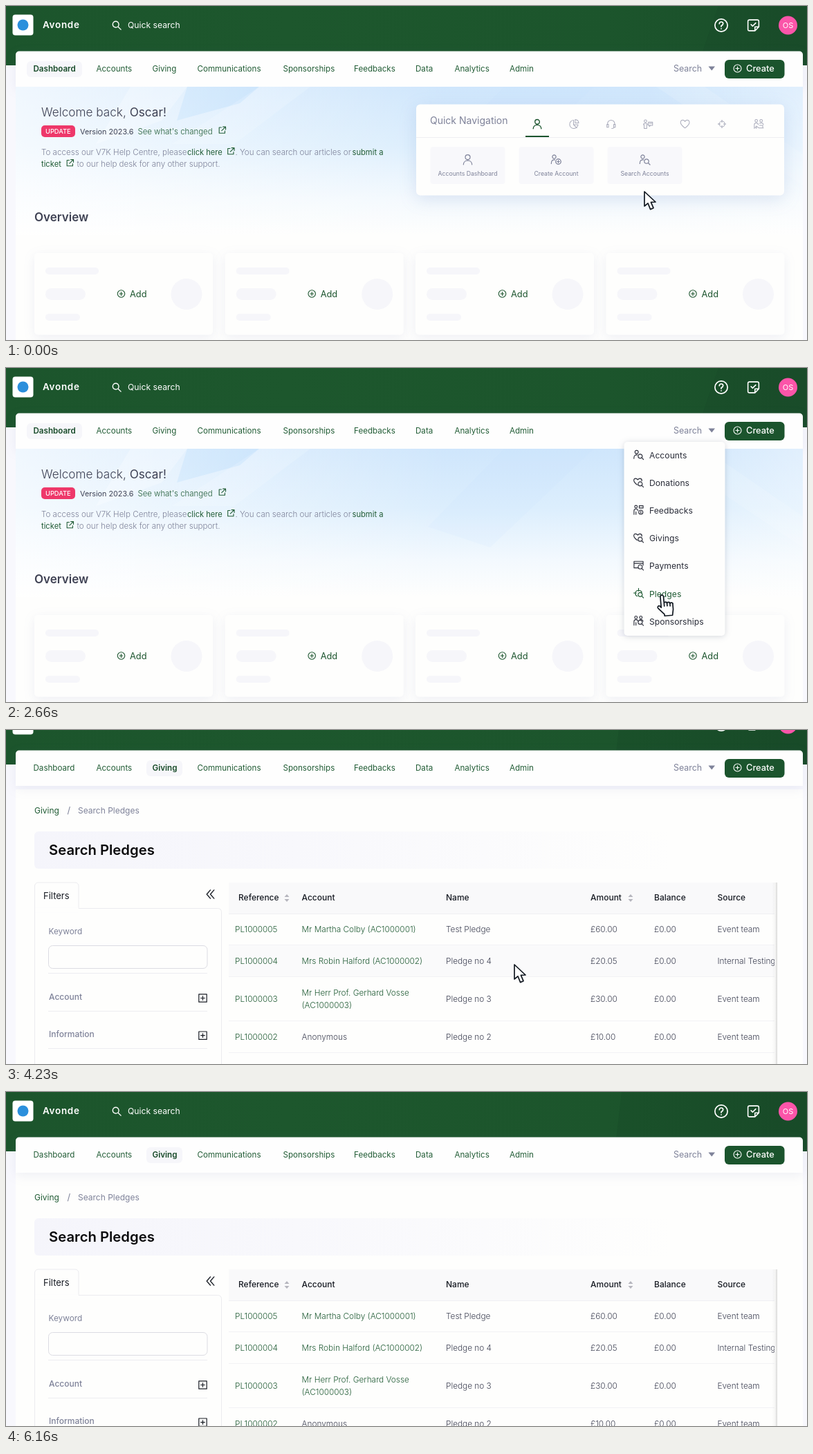
Recreate the animation shown at these times as an HTML page. Size 1158x484 px, loop 6.7 s.

```html
<!DOCTYPE html>
<html lang="en">
<head>
<meta charset="utf-8">
<title>Pledge search</title>
<style>
html, body { margin: 0; width: 100%; height: 100%; overflow: hidden; background: #f8f8fd; }
svg { display: block; width: 1158px; height: 484px; font-family: Inter, "Open Sans", sans-serif; }
text { white-space: pre; }
.soft { filter: drop-shadow(0 4px 8px #5060a018); }
.lift { filter: drop-shadow(0 6px 12px #5070b028); }
.drop { filter: drop-shadow(0 1px 4px #20305030); }
</style>
</head>
<body>
<svg id="stage" viewBox="0 0 1158 484"></svg>
<script>
const GREEN = '#1b542d', LINK = '#215c35', DARK = '#3f4254', GREY = '#7e8299', INK = '#181c24', PAPER = '#fefefd';
const LOOP = 6700, MAX_SCROLL = 177;

// ---- markup helpers ----
const text = (s, x, y, size = 12, fill = DARK, weight = 400, more = '') =>
  `<text x="${x}" y="${y}" font-size="${size}" fill="${fill}" font-weight="${weight}" ${more}>${s}</text>`;
const rect = (x, y, w, h, fill, r = 0, more = '') =>
  `<rect x="${x}" y="${y}" width="${w}" height="${h}" rx="${r}" fill="${fill}" ${more}/>`;
const poly = (points, fill, opacity) => `<polygon points="${points}" fill="${fill}" opacity="${opacity}"/>`;
const line = (x1, x2, y, colour = '#ededf1') => rect(x1, y, x2 - x1, 1, colour);
const group = (id, body, more = '') => `<g id="${id}" ${more}>${body}</g>`;
const ring = (x, y, r) => `M${x - r} ${y}a${r} ${r} 0 1 0 ${2 * r} 0a${r} ${r} 0 1 0 ${-2 * r} 0`;
const box = (x, y, w, h) => `M${x} ${y}h${w}v${h}h${-w}z`;
// Icons live on a 16-unit grid and are centred on x, y.
const icon = (name, x, y, size, colour, width = 1, more = '') =>
  `<path d="${icons[name]}" transform="translate(${x - size / 2} ${y - size / 2}) scale(${size / 16})" fill="none"
    stroke="${colour}" stroke-width="${width * 16 / size}" stroke-linecap="round" stroke-linejoin="round" ${more}/>`;

const lens = ring(10.5, 10.5, 3.2) + 'M13 13L15.5 15.5';
const person = ring(5, 4, 2.6) + 'M.8 14C.8 9 3 8.2 6 8.4';
const smallHeart = 'M6 12C-1 7 0 2.5 3 2.2Q5.5 2 6.8 4.2Q8 2 10.5 2.2Q13.5 2.7 13 6';
const pair = ring(4, 3, 2) + ring(11.5, 3, 2) + 'M1 15V9Q1 6.5 4 6.5T7 9M4 11v4M9 7Q14 5 15 9';
const icons = {
  person: ring(8, 4.6, 3.5) + 'M1.8 15.3C2 7.5 14 7.5 14.2 15.3',
  pie: 'M7 2A6.5 6.5 0 1 0 14 9H7zM9.5 1A6 6 0 0 1 15 6.5H9.5zM7 9L12 14',
  headset: 'M2.5 9V7.5a5.5 5.5 0 0 1 11 0V9M1.5 8.5h2.5v4.5h-2.5zM12 8.5h2.5v4.5h-2.5zM13 13Q12 15 9 15',
  chat: ring(4, 3.5, 2) + 'M1 9Q1 7 4 7T7 9M2 9v6h4V9' + box(8.5, 5, 6.5, 5) + 'M10 7h4M10 10v2l2-2',
  heart: 'M8 14.2C2 9.8.8 7 1.2 4.8C2 1.3 6.2 1 8 4.2C9.8 1 14 1.3 14.8 4.8C15.2 7 14 9.8 8 14.2z',
  target: ring(8, 8, 5) + 'M8 1v4M8 11v4M1 8h4M11 8h4',
  family: pair + 'M1 14L5 12L8 14H15M9 10h5v3',
  addPerson: person + ring(11, 11, 3.8) + 'M11 9.2v3.6M9.2 11h3.6',
  accounts: person + lens,
  donations: smallHeart + lens,
  feedbacks: ring(4, 3, 2) + 'M1 15V9Q1 6.5 4 6.5T7 9M4 11v4' + box(9, 1.5, 6, 3.5) + ring(11.5, 11.5, 3.2) + 'M11.5 10v3',
  givings: smallHeart + lens,
  payments: 'M7 12H1V2H15V8M1 5H15' + lens,
  pledges: 'M6 13Q3 12 3 8Q4 4 8 4Q12 4 13 7M8 1v4M.5 8h4' + lens,
  sponsorships: pair + lens,
  link: 'M6.5 2.5H2V14H13.5V9.5M9.5 1.2H15V6.5M15 1.2L7 9',
  plus: ring(8, 8, 7) + 'M8 4.8v6.4M4.8 8h6.4',
  plusBox: box(1.5, 1.5, 13, 13) + 'M8 4.8v6.4M4.8 8h6.4',
  search: ring(6.5, 6.5, 5) + 'M10.2 10.2L15 15',
  help: ring(8, 8, 7.3) + 'M5.8 6.2Q6 4 8 4T10.2 6Q10.2 7.3 8 8.6V9.6M8 11.8v.2',
  note: 'M10 15H3Q1 15 1 13V3Q1 1 3 1H13Q15 1 15 3V10zM10 15V10H15M5 7L7 9L11 5',
  collapse: 'M8 1L2 8L8 15M14 1L8 8L14 15'
};

// ---- header and navigation ----
const shades = {
  dash: poly('1030,0 1158,0 1158,86 1000,86', '#123e20', .12),
  list: poly('890,0 1158,0 1158,86 880,86', '#103c1f', .16)
};
const header = rect(0, 0, 1158, 86, 'url(#green)') + group('shadeDash', shades.dash) + group('shadeList', shades.list) +
  rect(9.5, 12.5, 30, 30, '#fff', 4) + '<circle cx="24.5" cy="27.5" r="8" fill="#2b8fdc"/>' +
  text('Avonde', 53, 32, 13.5, '#fff', 600, 'letter-spacing=".7"') +
  icon('search', 160, 28, 14, '#fff', 1.4) + text('Quick search', 176, 31.5, 12.2, '#fff') +
  icon('help', 1034, 28, 20, '#fff', 1.7) + icon('note', 1080.5, 28, 18, '#fff', 1.6) +
  '<circle cx="1130.5" cy="28" r="13.5" fill="#fb55a9"/>' +
  text('OS', 1130.5, 32, 11, '#fff', 400, 'text-anchor="middle"');

const tabs = [['Dashboard', 39.5], ['Accounts', 130.5], ['Giving', 211.5], ['Communications', 276.5], ['Sponsorships', 400.5],
  ['Feedbacks', 503], ['Data', 592], ['Analytics', 648.5], ['Admin', 728]];
const tabRow = (active, x, w) => rect(x, 80, w, 23, '#f6f6fa', 6) +
  tabs.map(([s, x]) => text(s, x, 95, 11.6, s == active ? '#174a28' : LINK, s == active ? 600 : 400)).join('');
const nav = '<path d="M14 117V70.5a5 5 0 0 1 5-5H1147a5 5 0 0 1 5 5V117z" fill="#fefefe" class="soft"/>' +
  group('tabsDash', tabRow('Dashboard', 30, 80)) + group('tabsList', tabRow('Giving', 203, 52)) +
  text('Search', 965, 95, 12.4, GREY) + '<path d="M1015.5 87.5h9.5l-4.7 6z" fill="#7e8299"/>' +
  rect(1039, 78, 86.5, 27, GREEN, 6) + icon('plus', 1057.5, 90.5, 12.5, '#fff', 1.1) + text('Create', 1070, 95, 12.8, '#fff', 500);

// ---- dashboard ----
const banner = rect(14, 117, 1138, 215, 'url(#sky)') +
  poly('262,117 366,117 338,141 247,166', '#8cc6f8', .35) + poly('225,166 262,117 180,117 130,200', '#fff', .25) +
  poly('366,117 440,117 330,200 240,200', '#fff', .15) + poly('720,117 850,117 700,260 610,230', '#b5dafa', .1) +
  poly('940,117 1010,117 1152,215 1152,260', '#fff', .12) + rect(14, 117, 1138, 215, 'url(#mist)');
const link = (x, y) => icon('link', x, y, 11.5, LINK, 1.1);
const note = (s, x, y) => text(s, x, y, 11.6, GREY, 300);
const welcome = text('Welcome back, <tspan font-weight="400">Oscar!</tspan>', 51, 160, 17.2, DARK, 300) +
  rect(51, 173, 49, 17, '#ee386a', 5) + text('UPDATE', 57, 185, 9.3, '#fff', 500) +
  text('Version 2023.6', 107, 185.5, 10.8) + text("See what's changed", 190.5, 185.5, 11.4, LINK, 300) + link(312.5, 180) +
  note('To access our V7K Help Centre, please', 51, 216) + text('click here', 262, 216, 11.1, LINK) + link(325, 210.5) +
  note('. You can search our articles or', 331.5, 216) + text('submit a', 500.5, 216, 11.2, LINK) +
  text('ticket', 51, 233, 11.2, LINK) + link(92.5, 227.5) + note('to our help desk for any other support.', 102.5, 233);

const quickIcons = ['person', 'pie', 'headset', 'chat', 'heart', 'target', 'family']
  .map((n, i) => icon(n, 768 + i * 53.4, 171, i == 5 ? 13 : 15, i ? '#a9abbb' : GREEN, i ? 1 : 1.4)).join('');
const quickCard = rect(593, 142.5, 532, 132, PAPER, 6, 'class="lift"') + text('Quick Navigation', 613, 171, 14, GREY) +
  line(593, 1125, 190, '#eeeef2') + rect(751, 188, 34, 2, GREEN) +
  [['person', 'Accounts Dashboard'], ['addPerson', 'Create Account'], ['accounts', 'Search Accounts']].map(([n, s], i) => {
    const x = 667.5 + i * 128;
    return `<g id="quick${i}">` + rect(x - 54, 204, 108, 54, '#f8f8fb', 4) + icon(n, x, 222.5, 16, GREY, 1.2) +
      text(s, x, 246, 8.7, GREY, 400, 'text-anchor="middle"') + '</g>';
  }).join('');
const tile = x => rect(x, 358, 258, 118.5, PAPER, 5, 'class="soft"') +
  [[379, 77, 10], [409, 58, 17], [446, 50, 10]].map(([y, w, h]) => rect(x + 16, y, w, h, '#f6f6fa', h / 2)).join('') +
  `<circle cx="${x + 220}" cy="417.5" r="22.5" fill="#f6f6fa"/>` +
  icon('plus', x + 125.5, 417, 12, GREEN, 1.1) + text('Add', x + 138, 421.5, 12.8, GREEN);
const dash = banner + welcome + group('quickCard', quickCard) + group('quickIcons', quickIcons) +
  text('Overview', 41, 312, 17, DARK, 600) + [41, 316.7, 592, 867.5].map(tile).join('');

const options = ['Accounts', 'Donations', 'Feedbacks', 'Givings', 'Payments', 'Pledges', 'Sponsorships'];
const menu = rect(893.5, 107, 146, 281, PAPER, 5, 'class="drop"') + options.map((s, i) =>
  `<g class="option">${icon(s.toLowerCase(), 914.5, 125.5 + i * 40.1, 15, 'currentColor', 1.15)}` +
  text(s, 930, 131 + i * 40.1, 12.2, 'currentColor') + '</g>').join('');

// ---- pledge list ----
const columns = [['Reference', 336], ['Account', 427.5], ['Name', 636], ['Amount', 845], ['Balance', 937], ['Source', 1028.5]];
const rows = [
  [302, 46, 'PL1000005', 'Mr Martha Colby (AC1000001)', 'Test Pledge', '£60.00', 'Event team'],
  [348, 46, 'PL1000004', 'Mrs Robin Halford (AC1000002)', 'Pledge no 4', '£20.05', 'Internal Testing'],
  [394, 64, 'PL1000003', 'Mr Herr Prof. Gerhard Vosse|(AC1000003)', 'Pledge no 3', '£30.00', 'Event team'],
  [458, 46, 'PL1000002', 'Anonymous', 'Pledge no 2', '£10.00', 'Event team'],
  [504, 46, 'PL1000001', 'Mr Martha Colby (AC1000001)', 'Pledge no. 1', '£50.00', 'Internal Testing']
];
const tableRow = ([y, h, ref, account, name, amount, source]) => {
  const base = y + h / 2 + 4, lines = account.split('|');
  const cell = (s, x, colour = DARK, dy = 0) => text(s, x, base + dy, 11.8, colour, 300);
  return rect(322, y, 793, h, '#fafafb', 0, 'class="row" opacity="0"') + line(322, 1115, y + h - 1, '#f2f2f5') +
    cell(ref, 331, LINK) +
    lines.map((s, i) => cell(s, 427.5, account == 'Anonymous' ? DARK : LINK, (i - (lines.length - 1) / 2) * 18)).join('') +
    cell(name, 636) + cell(amount, 845) + cell('£0.00', 937) + cell(source, 1028.5);
};
const sorter = x => `<path d="M${x - 3.5} 278l3.5-4 3.5 4zm0 3h7l-3.5 4z" fill="#b5b5bd"/>`;
const table = '<g clip-path="url(#tableClip)">' + rect(322, 257, 793, 45, '#f9f9fa') +
  columns.map(([s, x]) => text(s, x, 283, 12, INK, 500)).join('') + sorter(406) + sorter(903) +
  line(322, 1115, 302, '#f0f0f3') + rows.map(tableRow).join('') + '</g>' +
  rect(1107, 257, 8, 298, 'url(#edge)') + rect(322, 550, 472, 5, '#c6c6c9', 2);

const panel = bottom => rect(41.5, 294.5, 270, bottom - 294.5, PAPER, 5, 'stroke="#ebebef"') +
  '<path d="M41.5 300V262a5 5 0 0 1 5-5H100a5 5 0 0 1 5 5V295" fill="#fefefd" stroke="#ebebef"/>' + rect(42, 293.5, 62.5, 7, PAPER);
const skeleton = panel(461) + [[328, 88], [362, 230], [388.5, 230], [415, 140]]
  .map(([y, w]) => rect(61, y, w, 13.5, 'url(#bone)', 3)).join('');
const filters = panel(680) + text('Keyword', 61.5, 332, 11.8, GREY) + rect(61.5, 348.5, 229.5, 33, PAPER, 6, 'stroke="#dcdce3"') +
  line(61, 291, 388) + ['Account', 'Information', 'Date'].map((s, i) => {
    const y = 423 + i * 54.2;
    return text(s, 62, y + 3.5, 12, GREY, 500) + icon('plusBox', 284.5, y + 1.5, 14, INK, 1.2) + line(61, 291, Math.round(y + 20));
  }).join('') + rect(61, 569, 230, 33, GREEN, 5) + icon('search', 149, 585, 12, '#fff', 1.3) +
  text('Search', 162, 590.5, 14, '#fff', 500, 'letter-spacing=".3"') +
  rect(61.5, 622.5, 229, 33, PAPER, 5, `stroke="${GREEN}"`) + text('Reset All', 147, 644, 14, LINK);
const spinner = [0, 1, 2, 3].map(i =>
  `<circle cx="6.5" r="2.8" fill="${GREEN}" opacity="${[.55, .35, .3, .3][i]}" transform="rotate(${-90 * i})"/>`).join('');
const list = text('Giving', 41, 157, 12, LINK) + text('/', 88.5, 157, 13, GREY) + text('Search Pledges', 104, 157, 12, GREY) +
  rect(41, 183, 1084, 54, 'url(#strip)', 6) + text('Search Pledges', 62, 216.5, 20.3, '#0a0a0c', 600) +
  group('skeleton', skeleton) + group('filters', filters) + text('Filters', 54, 280.5, 13, INK) +
  icon('collapse', 295.5, 274, 14, INK, 1.4) + group('table', table) + group('spinner', spinner);

// ---- stage ----
const gradient = (id, stops, vertical) => `<linearGradient id="${id}" x2="${vertical ? 0 : 1}" y2="${vertical ? 1 : 0}">` +
  stops.map(([o, c]) => `<stop offset="${o}" stop-color="${c}"/>`).join('') + '</linearGradient>';
const pointer = 'fill="#fff" stroke="#111820" stroke-width="1.7" stroke-linejoin="round"';
stage.innerHTML = '<defs>' +
  gradient('green', [[0, '#1c552c'], [.35, '#1d572d'], [.75, '#1c552c'], [1, '#1a4e2a']]) +
  gradient('sky', [[0, '#cfe6fc'], [.4, '#dceefd'], [.75, '#f3f9fe'], [1, '#fefefd']], true) +
  gradient('mist', [[0, '#ffffffb0'], [.2, '#ffffff70'], [.55, '#ffffff00'], [.8, '#ffffff00'], [1, '#ffffff60']]) +
  gradient('strip', [[0, '#f5f5fb'], [.35, '#f8f8fc'], [.85, PAPER]]) +
  gradient('edge', [[0, '#00000000'], [.6, '#00000008'], [1, '#00000026']]) +
  gradient('bone', [[0, '#e0e0e2'], [1, '#ededef']]) +
  '<clipPath id="tableClip"><rect x="322" y="250" width="789" height="320"/></clipPath></defs>' +
  rect(0, 0, 1158, 484, '#f8f8fd') + rect(14, 86, 1138, 398, PAPER) +
  group('page', header + group('list', list)) + group('nav', nav) + group('dash', dash) + group('menu', menu) +
  group('cursor', `<path id="arrow" d="M0 0V21L5 16.8L8.6 25.6L13 23.7L9.4 15.4L16 15z" ${pointer}/>` +
    `<path id="hand" d="M-2.3 18V2.5a2.3 2.3 0 0 1 4.6 0V12.5a2.1 2.1 0 0 1 4.2 .4a2.1 2.1 0 0 1 4.2 .8a2 2 0 0 1 4 1.4V22L13 30.5H1.5V28L-7 18.5a2 2 0 0 1 3-2.6zM2.3 12.5v4.5M6.5 13v4M10.7 14v3.5"
      transform="rotate(-5)" ${pointer}/>`);

// ---- motion ----
const $ = id => document.getElementById(id);
const show = (id, on) => $(id).setAttribute('opacity', +on);
const move = (id, x, y, more = '') => $(id).setAttribute('transform', `translate(${x} ${y}) ${more}`);
const clamp = p => Math.min(1, Math.max(0, p));
const ramp = (t, a, b) => clamp((t - a) / (b - a));
const ease = (t, a, b) => { const p = ramp(t, a, b); return p * p * (3 - 2 * p); };

// time, x, y of the pointer tip
const path = [[0, 923, 269], [260, 923, 269], [630, 999, 84], [1440, 999, 84], [1860, 950, 121], [1900, 950, 121],
  [2560, 947, 322], [2600, 947, 322], [2660, 948, 329], [3720, 948, 330], [3960, 735, 340], [5900, 735, 340], [6160, 750, 510], [LOOP, 750, 510]];
function tip(t) {
  const i = path.findIndex(k => k[0] > t), [t0, x0, y0] = path[i - 1], [t1, x1, y1] = path[i];
  const p = ease(t, t0, t1);
  return [x0 + (x1 - x0) * p, y0 + (y1 - y0) * p];
}
const scrollAt = t => 36 * ease(t, 4000, 4230) + (MAX_SCROLL - 36) * ease(t, 4630, 4860) - MAX_SCROLL * ease(t, 5260, 5700);

function draw(t) {
  const [x, y] = tip(t), scroll = scrollAt(t);
  const onList = t >= 3320, loaded = t >= 3860;

  move('page', 0, -scroll);
  move('nav', 0, -Math.min(scroll, 73));
  for (const name of ['shade', 'tabs']) {
    show(name + 'Dash', !onList);
    show(name + 'List', onList);
  }

  show('dash', onList ? 0 : 1 - ramp(t, 2900, 3220));
  show('quickCard', 1 - ramp(t, 1220, 1380));
  show('quickIcons', t < 1450);
  show('menu', onList ? 0 : ramp(t, 1200, 1380));
  const onCard = t < 1200 && x > 869 && x < 978 && y > 204 && y < 258;
  $('quick2').style.filter = onCard ? 'brightness(.96)' : '';
  document.querySelectorAll('.option').forEach((el, i) => {
    const hot = t > 1450 && Math.abs(y - 127 - i * 40.1) < 20;
    el.setAttribute('color', hot ? LINK : '#2b2e3a');
  });

  show('list', onList);
  show('skeleton', !loaded);
  show('filters', loaded);
  show('table', loaded ? 1 : .33);
  show('spinner', !loaded);
  move('spinner', 718.7, 405.5, `rotate(${20 + (t - 3700) * .36})`);
  document.querySelectorAll('.row').forEach((el, i) => {
    const top = rows[i][0] - scroll;
    el.setAttribute('opacity', +(loaded && y < 484 && y >= top && y < top + rows[i][1]));
  });

  const isHand = t < 3740 && (onCard || y < 110 || t > 1200);
  show('hand', isHand);
  show('arrow', !isHand);
  move('cursor', x, y);
}
function frame() {
  draw(performance.now() % LOOP);
  requestAnimationFrame(frame);
}
frame();
</script>
</body>
</html>
```
